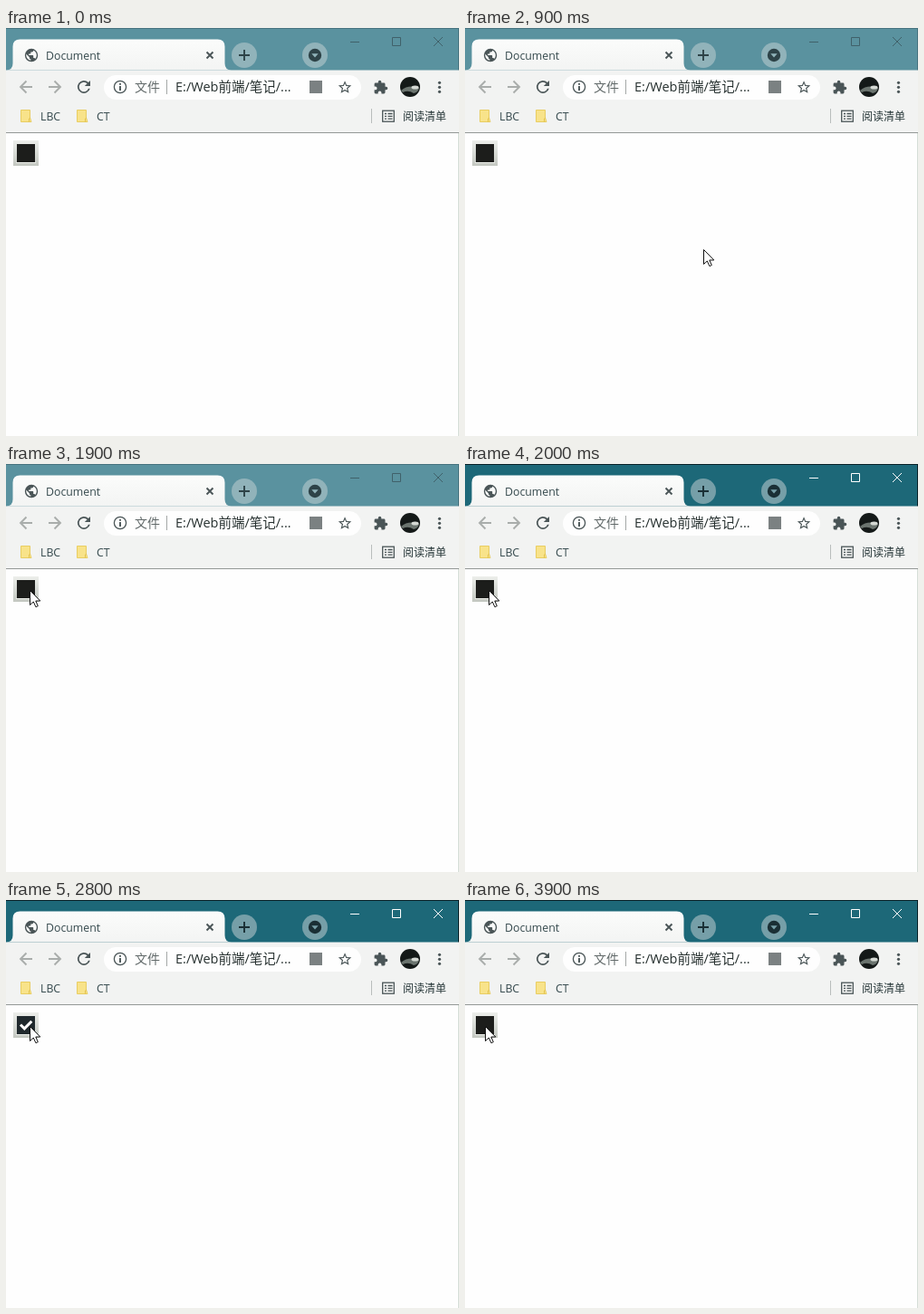
Write an HTML page that moves like this. It is 500 px wide and 450 px high and loops after 4 s.

```html
<!DOCTYPE html>
<html lang="zh">
<head>
<meta charset="utf-8">
<title>Document</title>
<style>
  html, body { margin: 0; width: 100%; height: 100%; overflow: hidden; background: #fefefe; }
  svg { display: block; width: 500px; height: 450px; }
  text { font-family: "Open Sans", "Noto Sans CJK SC", "Noto Sans CJK", sans-serif; font-size: 12.3px; fill: #35494d; }
  .line { fill: none; stroke: #4a5557; stroke-width: 1.9; }
  .thin { fill: none; stroke: #4a5557; stroke-width: 1.3; }
  .icon { fill: #4a5557; }
  .pale { stroke: #a9adab; }

  .bar, .edge, .ring, .ink, .win, #tick, #dark, #cursor { animation: 4s step-end infinite; }
  .bar { fill: #5a929f; animation-name: bar; }
  .edge { fill: #47747f; animation-name: edge; }
  .ring { fill: #91b3ba; animation-name: ring; }
  .ink { color: #2e4348; animation-name: ink; }
  .win { fill: none; stroke: #40616a; animation-name: win; }
  #tick { visibility: hidden; animation-name: tick; }
  #dark { fill: #1c1d1b; animation-name: dark; }
  #cursor { animation-name: move; }

  /* the window gains focus on the first press */
  @keyframes bar { 50%, 100% { fill: #1d6878; } }
  @keyframes edge { 50%, 100% { fill: #0b2229; } }
  @keyframes ring { 50%, 100% { fill: #769fa8; } }
  @keyframes ink { 50%, 100% { color: #1a2f35; } }
  @keyframes win { 50%, 100% { stroke: #fff; } }

  @keyframes tick { 0% { visibility: hidden; } 70% { visibility: visible; } 87.5%, 100% { visibility: hidden; } }
  @keyframes dark { 0% { fill: #1c1d1b; } 70% { fill: #20292d; } 87.5%, 100% { fill: #1c1d1b; } }

  @keyframes move {
    0% { transform: translate(265px, 248px); visibility: hidden; }
    2.5% { transform: translate(265px, 248px); visibility: visible; }
    22.5% { transform: translate(263px, 244px); }
    25% { transform: translate(238px, 231px); }
    27.5% { transform: translate(185px, 205px); }
    30% { transform: translate(122px, 174px); }
    32.5% { transform: translate(71px, 150px); }
    35% { transform: translate(44px, 140px); }
    37.5% { transform: translate(37px, 140px); }
    40% { transform: translate(31px, 139px); }
    42.5% { transform: translate(28px, 139px); }
    45% { transform: translate(26px, 139px); }
    92.5% { transform: translate(24px, 139px); }
    95%, 100% { transform: translate(22px, 139px); visibility: visible; }
  }
</style>
</head>
<body>
<svg viewBox="0 0 500 450">
  <defs>
    <linearGradient id="tab" x2="0" y2="1">
      <stop offset="0" stop-color="#fbfcfb"/><stop offset="1" stop-color="#f3f4f3"/>
    </linearGradient>
    <linearGradient id="frame" x2="0" y2="1">
      <stop offset="0" stop-color="#eceeea"/><stop offset="1" stop-color="#c3c7c0"/>
    </linearGradient>
    <g id="note">
      <path d="M.5 .5H10.5V9L12 13.5H.5Z" fill="#f8e38a" stroke="#e8cd62"/>
      <path d="M9.5 13.5V10L11 9" fill="none" stroke="#e2c14d"/>
    </g>
  </defs>

  <rect width="500" height="450" fill="#fefefe"/>
  <path d="M499.5 116V450" stroke="#d5ddd7"/>

  <!-- title bar and tab -->
  <rect class="bar" width="500" height="48"/>
  <path class="edge" d="M0 0H500V47H499V1H0Z"/>
  <path d="M0 46.5Q7.500 46.500 7.500 39V20.500Q7.500 12.500 15.500 12.500H233.500Q241.500 12.500 241.500 20.500V39Q241.500 46.500 249 46.500Z" fill="url(#tab)"/>
  <path class="icon" transform="translate(19.400 21.400) scale(.72)" d="M12 2a10 10 0 1 0 0 20 10 10 0 0 0 0-20zm-1 17.900c-3.950-.500-7-3.850-7-7.900 0-.6.100-1.200.200-1.800L9 15v1c0 1.100.9 2 2 2zm6.900-2.500c-.3-.8-1-1.400-1.900-1.400h-1v-3c0-.5-.5-1-1-1H8v-2h2c.5 0 1-.5 1-1V7h2c1.100 0 2-.9 2-2v-.4c2.900 1.200 5 4 5 7.400 0 2.100-.8 4-2.100 5.400z"/>
  <text x="44" y="35">Document</text>
  <path class="line" d="M221.5 26.5l7 7m0-7l-7 7"/>
  <circle class="ring" cx="263" cy="30" r="14"/>
  <circle class="ring" cx="341" cy="30" r="14"/>
  <g class="ink">
    <path d="M257 30h12m-6-6v12" stroke="currentColor" stroke-width="1.9"/>
    <circle cx="341" cy="30" r="7.2" fill="currentColor"/>
  </g>
  <path class="ring" d="M337.3 28.3h7.4L341 32.5z"/>
  <path class="win" d="M380 15.500h10M426.500 10.500h9v9h-9zM472 10l10 10m0-10l-10 10"/>

  <!-- toolbar -->
  <rect y="46.500" width="500" height="68.500" fill="#f2f3f2"/>
  <path d="M0 115.5H500" stroke="#949897"/>
  <path class="line pale" d="M29 65H16m6.5-6.5L16 65l6.5 6.5"/>
  <path class="line pale" d="M47 65h13m-6.5-6.5L60 65l-6.5 6.5"/>
  <path class="icon" transform="translate(75.400 54.400) scale(.88)" d="M17.650 6.350A8 8 0 1 0 19.730 14h-2.080A6 6 0 1 1 16.220 7.780L13 11h7V4z"/>
  <rect x="108" y="52" width="284" height="27" rx="13.5" fill="#fefefe"/>
  <circle class="thin" cx="126" cy="65" r="6.6"/>
  <path class="line" d="M126 64v5m0-8v1.8"/>
  <text x="142" y="70" style="font-size:14px;fill:#626a6a">文件</text>
  <path d="M177.5 57V73" stroke="#a3a7a6"/>
  <text x="187" y="70" style="font-size:14.5px;fill:#26302f">E:/Web前端/笔记/...</text>
  <rect x="335" y="58" width="14" height="14" fill="#7b8182"/>
  <path class="icon" transform="translate(365.400 56.700) scale(.72)" d="M22 9.240l-7.190-.62L12 2 9.190 8.630 2 9.240l5.460 4.730L5.820 21 12 17.270 18.180 21l-1.630-7.030zM12 15.400l-3.760 2.270 1-4.280-3.320-2.880 4.380-.38L12 6.100l1.710 4.040 4.380.38-3.320 2.880 1 4.280z"/>
  <path class="icon" transform="translate(405.200 57) scale(.7)" d="M20.500 11H19V7a2 2 0 0 0-2-2h-4V3.500a2.500 2.500 0 0 0-5 0V5H4a2 2 0 0 0-2 2v3.800h1.500a2.700 2.700 0 0 1 0 5.400H2V20a2 2 0 0 0 2 2h3.800v-1.500a2.700 2.700 0 0 1 5.400 0V22H17a2 2 0 0 0 2-2v-4h1.500a2.500 2.500 0 0 0 0-5z"/>
  <circle cx="446" cy="65" r="11" fill="#141918"/>
  <path d="M436 69Q444 62 456 66Q455 71 450 72Q444 68 438 71Z" fill="#6b746f"/>
  <ellipse cx="451.500" cy="65.500" rx="4" ry="2" fill="#d5d9d4"/>
  <g class="icon"><circle cx="478.5" cy="60.3" r="1.6"/><circle cx="478.5" cy="65.3" r="1.6"/><circle cx="478.5" cy="70.3" r="1.6"/></g>

  <!-- bookmarks -->
  <use href="#note" x="16" y="90"/>
  <text x="38" y="102">LBC</text>
  <use href="#note" x="78" y="90"/>
  <text x="100" y="102">CT</text>
  <path d="M403.5 89V105" stroke="#b9bdbc"/>
  <rect class="thin" x="415.7" y="91.2" width="12.6" height="12"/>
  <path class="thin" d="M418 94.5h2m1.5 0h5M418 97.3h2m1.5 0h5M418 100.1h2m1.5 0h5"/>
  <text x="438" y="102" style="font-size:12px;fill:#263638">阅读清单</text>

  <!-- checkbox -->
  <rect x="8" y="124" width="28" height="28" fill="url(#frame)"/>
  <path d="M11 148.5H33" stroke="#eef0ec"/>
  <rect id="dark" x="12" y="128" width="20" height="20"/>
  <path id="tick" d="M16 137.5l4.3 4.3 8-8" fill="none" stroke="#fff" stroke-width="3"/>

  <path id="cursor" d="M.5 .5V16.5L4.3 13 6.900 18.700 9.300 17.600 6.800 12H11.800Z" fill="#fff" stroke="#111"/>
</svg>
</body>
</html>
```
